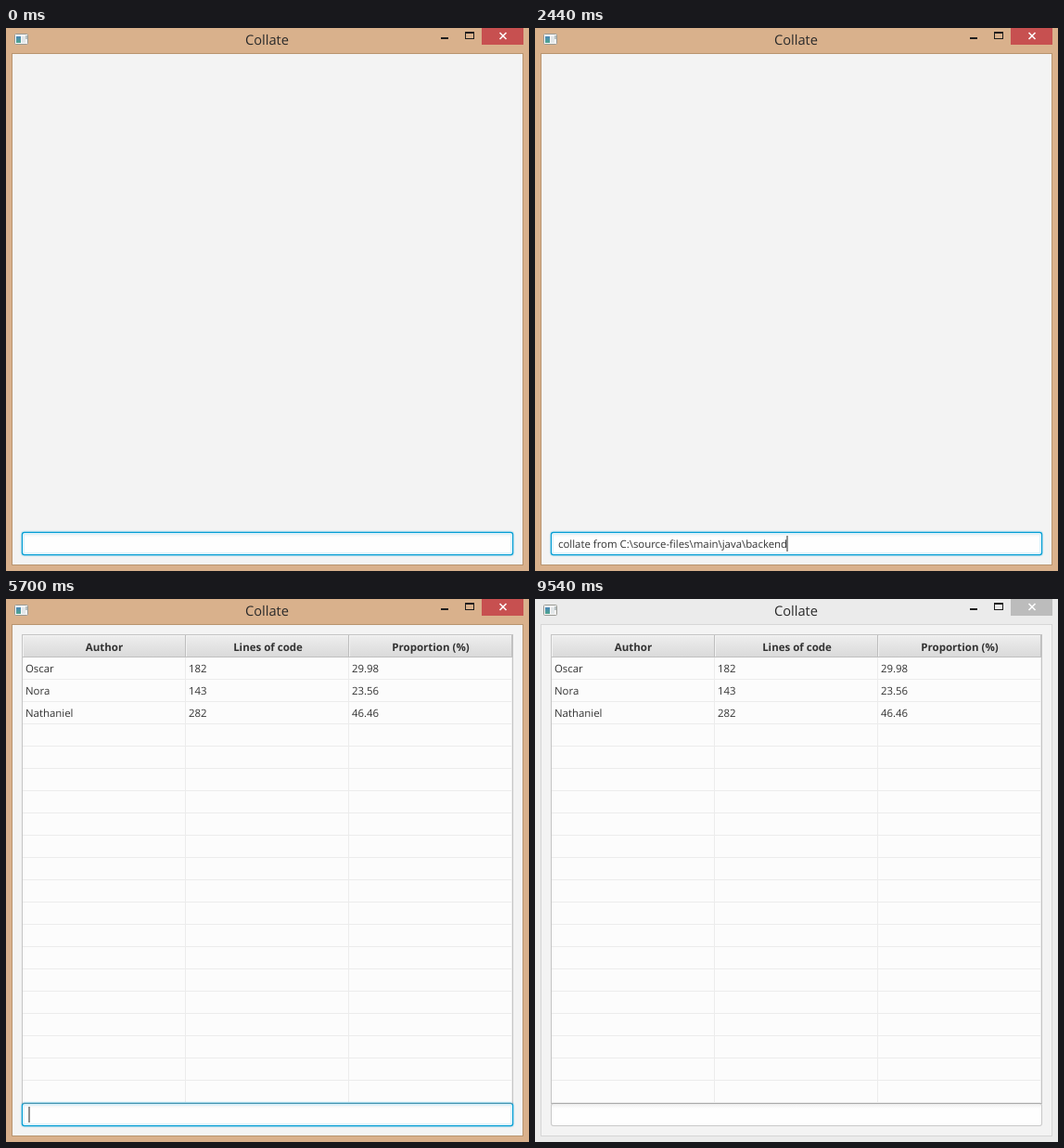
Animation, 564 px wide and 585 px high, one loop 9660 ms. Source, as an HTML page:

```html
<!DOCTYPE html>
<html lang="en">
<head>
<meta charset="utf-8">
<title>Collate</title>
<style>
  html, body { margin: 0; width: 100%; height: 100%; overflow: hidden; }
  svg { display: block; width: 564px; height: 585px; }
  text {
    font: 11.4px "Open Sans", "Noto Sans", sans-serif;
    fill: #333; white-space: pre; text-rendering: geometricPrecision;
  }
  .title { font-size: 14.65px; fill: #2a2a2a; text-anchor: middle; }
  .head { font-size: 11.5px; font-weight: 700; text-anchor: middle; }
  .frame { fill: #d9b18c; }
  .edge { fill: #f3f3f3; stroke: #b8946f; }
  .close { fill: #c75050; }
  .inactive .frame { fill: #ebebeb; }
  .inactive .edge { stroke: #d6d6d6; }
  .inactive .close { fill: #bcbcbc; }
  .inactive .focus, .blur { display: none; }
  .inactive .blur { display: inline; }
</style>
</head>
<body>
<svg id="stage" viewBox="0 0 564 585">
  <defs>
    <linearGradient id="headFill" x2="0" y2="1">
      <stop offset="0" stop-color="#eeeeee"/>
      <stop offset="1" stop-color="#dadada"/>
    </linearGradient>
    <linearGradient id="fieldFill" gradientUnits="userSpaceOnUse" x1="0" y1="543" x2="0" y2="549">
      <stop offset="0" stop-color="#ececec"/>
      <stop offset="1" stop-color="#fefefe"/>
    </linearGradient>
    <linearGradient id="pane" x2="0" y2="1">
      <stop offset="0" stop-color="#4a86b8"/>
      <stop offset="1" stop-color="#4fa58c"/>
    </linearGradient>
  </defs>

  <rect class="frame" width="564" height="585"/>
  <rect class="edge" x="6.5" y="27.5" width="551" height="551"/>

  <g id="icon">
    <rect x="9.5" y="6.5" width="14" height="11" rx="1" fill="#f6f6f6" stroke="#9a9a94"/>
    <rect x="11" y="9" width="5" height="7" fill="url(#pane)"/>
    <rect x="17" y="9" width="4" height="7" fill="#e2e6e8"/>
    <rect x="21" y="8" width="2" height="4" fill="#b9c2c4"/>
  </g>
  <text class="title" x="281.5" y="18">Collate</text>

  <rect x="469" y="10" width="8" height="2" fill="#1e1e1e"/>
  <path d="M495 4h10v8h-10zM496 6v5h8v-5z" fill="#1e1e1e" fill-rule="evenodd"/>
  <rect class="close" x="513" width="45" height="18"/>
  <path d="M532.5 5l7 7M539.5 5l-7 7" stroke="#fff" stroke-width="1.6"/>

  <g id="table"></g>

  <g class="focus">
    <rect x="16.8" y="542.8" width="530.4" height="25.4" rx="3" fill="#039ed3"/>
    <rect x="18" y="544" width="528" height="23" rx="2" fill="#fff"/>
    <rect x="15.6" y="541.6" width="532.8" height="27.8" rx="4" fill="#039ed3" opacity=".13"/>
    <rect x="20" y="546" width="524" height="19" fill="url(#fieldFill)"/>
  </g>
  <g class="blur">
    <rect x="17" y="543" width="530" height="25" rx="3" fill="#c8c8c8"/>
    <rect x="18" y="544" width="528" height="23" rx="2" fill="url(#fieldFill)"/>
  </g>
  <rect id="seam" x="17" y="543" width="530" height="1" fill="#909090" opacity=".5"/>

  <text id="typed" x="25" y="560"></text>
  <rect id="caret" y="547" width="1" height="17" fill="#222"/>
</svg>

<script>
const LOOP = 9660, SHOW_TABLE = 5700, LOSE_FOCUS = 9540;
const COMMAND = "collate from C:\\source-files\\main\\java\\backend only";

// [time, characters typed so far]
const KEYS = [
  [0, 0], [660, 1], [770, 2], [1020, 3], [1110, 4], [1200, 5], [1330, 6],
  [1410, 7], [1490, 8], [1960, 10], [2110, 11], [2150, 12], [2200, 13],
  [2440, 46], [2970, 47], [3280, 48], [3330, 49], [3510, 50], [3660, 51],
  [SHOW_TABLE, 0]
];
// The caret flips between hidden and shown at these times.
const BLINKS = [130, 4120, 4650, 5140, 5700, 5980, 6450, 6910, 7410, 7970, 8470, 8930, 9390, LOSE_FOCUS];

const COLUMNS = [
  { x: 18, mid: 106, name: "Author", cells: ["Oscar", "Nora", "Nathaniel"] },
  { x: 194, mid: 282.5, name: "Lines of code", cells: ["182", "143", "282"] },
  { x: 370, mid: 458, name: "Proportion (%)", cells: ["29.98", "23.56", "46.46"] }
];

const $ = id => document.getElementById(id);
const stage = $("stage"), table = $("table"), seam = $("seam"), typed = $("typed"), caret = $("caret");

const box = (x, y, w, h, fill) =>
  `<rect x="${x}" y="${y}" width="${w}" height="${h}" fill="${fill}"/>`;
const label = (x, y, str, cls = "") => `<text class="${cls}" x="${x}" y="${y}">${str}</text>`;

function buildTable() {
  let out = box(17, 38, 530, 505, "#c4c4c4") + box(18, 39, 528, 504, "#fcfcfc");
  for (let y = 86; y < 543; y += 24) out += box(18, y, 528, 1, "#ececec");
  out += box(18, 39, 528, 23, "url(#headFill)") + box(18, 39, 528, 1, "#f4f4f4") + box(18, 62, 528, 1, "#c0c0c0");
  for (const { x, mid, name, cells } of COLUMNS) {
    out += box(x + 175, 39, 1, 23, "#bebebe") + box(x, 39, 1, 23, "#f2f2f2");
    out += box(x + 175, 63, 1, 480, "#ececec") + label(mid, 56, name, "head");
    cells.forEach((cell, i) => out += label(x + 3, 79 + 24 * i, cell));
  }
  table.innerHTML = out;
}

const show = (el, on) => el.style.display = on ? "" : "none";

function draw(t) {
  const count = KEYS.filter(k => k[0] <= t).pop()[1];
  const text = COMMAND.slice(0, count);
  if (typed.textContent !== text) typed.textContent = text;
  caret.setAttribute("x", 24.5 + (count ? typed.getComputedTextLength() : 0));
  show(caret, BLINKS.filter(b => b <= t).length % 2);
  show(table, t >= SHOW_TABLE);
  show(seam, t >= SHOW_TABLE);
  stage.classList.toggle("inactive", t >= LOSE_FOCUS);
}

buildTable();
const start = performance.now();
function tick() {
  draw((performance.now() - start) % LOOP);
  requestAnimationFrame(tick);
}
tick();
</script>
</body>
</html>
```
